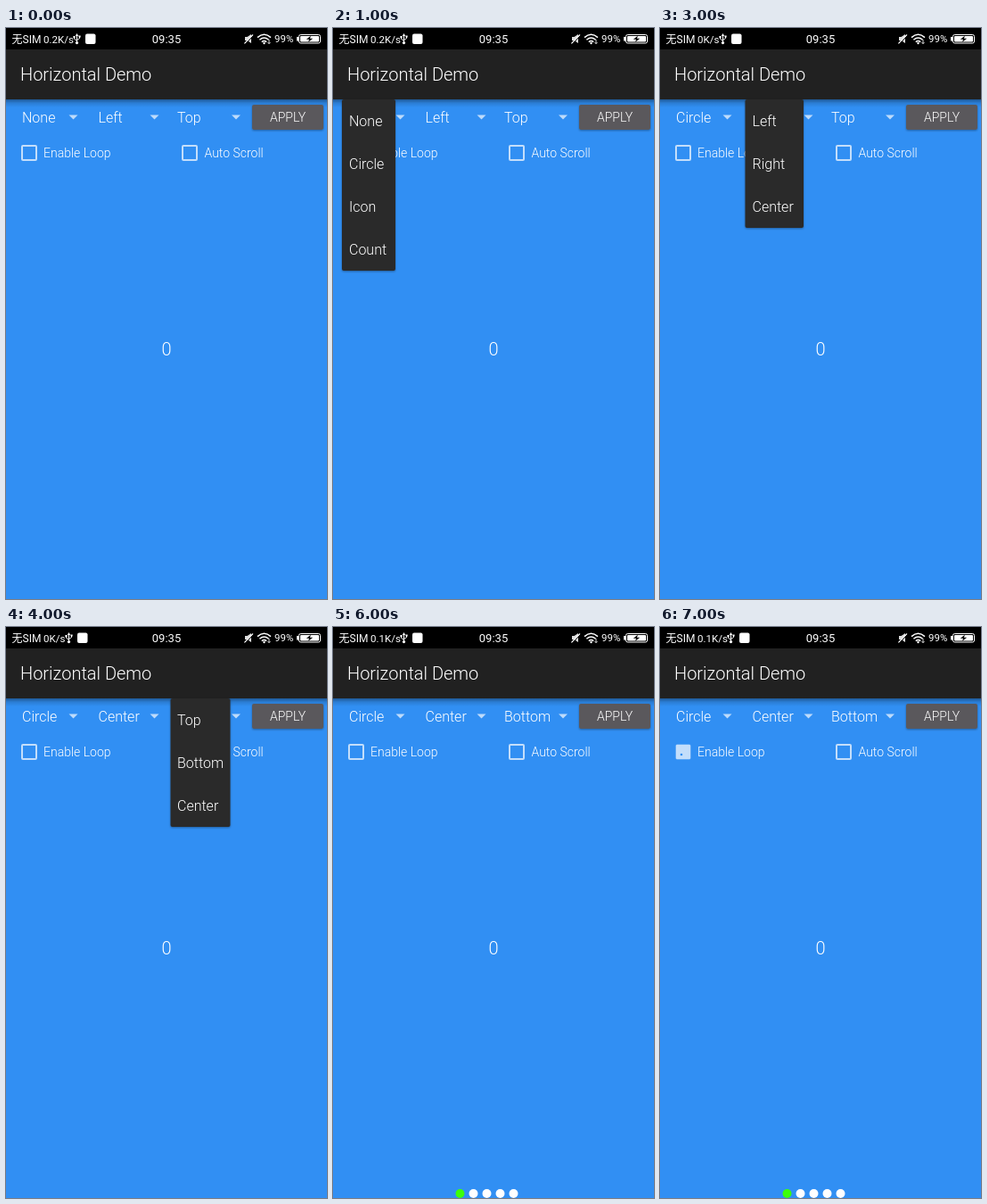
These frames come from a looping animation (360 by 640 pixels, 8 s). An HTML page:

```html
<!DOCTYPE html>
<html lang="en">
<head>
<meta charset="utf-8">
<title>Horizontal Demo</title>
<style>
  html, body { margin: 0; width: 100%; height: 100%; overflow: hidden; background: #318ff3; }
  svg { display: block; width: 360px; height: 640px; }
  text { font-family: Roboto, "Noto Sans CJK SC", "Noto Sans CJK", sans-serif; font-weight: 300; fill: #fff; }
  .status text { font-size: 12px; font-weight: 400; }
  .title, .page { font-size: 20px; }
  .item { font-size: 16px; }
  .small { font-size: 14px; }
  .mid { text-anchor: middle; }
  .line { fill: none; stroke: #fff; }
  .box { fill: none; stroke: #c3defb; stroke-width: 2; }
  .arrow { fill: #bddbfb; }
</style>
</head>
<body>
<svg viewBox="0 0 360 640">
  <defs>
    <linearGradient id="shade" x2="0" y2="1">
      <stop offset="0" stop-opacity=".38"/>
      <stop offset=".45" stop-opacity=".13"/>
      <stop offset="1" stop-opacity="0"/>
    </linearGradient>
    <filter id="lift" x="-15%" y="-15%" width="130%" height="140%">
      <feDropShadow dx="0" dy="1" stdDeviation="1" flood-opacity=".35"/>
    </filter>
  </defs>

  <rect width="360" height="640" fill="#318ff3"/>
  <text class="page mid" x="180" y="367">0</text>
  <g id="dots"></g>

  <rect y="80" width="360" height="9" fill="url(#shade)"/>
  <rect y="24" width="360" height="56" fill="#212121"/>
  <text class="title" x="16" y="59">Horizontal Demo</text>

  <g class="status">
    <rect width="360" height="24"/>
    <text x="6.5" y="16.5">无SIM</text>
    <text id="speed" x="42" y="16.5" style="font-size:11.5px"></text>
    <g id="icons">
      <path class="line" d="M79.5 8V17M76.5 10V12.2L79.5 14.2M82.5 9.5V11.6L79.5 13.6"/>
      <path d="M77.8 9L79.5 6L81.2 9ZM75.4 9h2.2v2h-2.2ZM81.4 8.6h2.2v2h-2.2Z" fill="#fff"/>
      <circle cx="79.5" cy="16.6" r="1.6" fill="#fff"/>
      <rect x="89" y="6.5" width="11.5" height="11.5" rx="2" fill="#fff"/>
    </g>
    <text class="mid" x="180" y="16.8" style="font-size:13px">09:35</text>
    <path d="M268 10h2.5L275 7V17L270.5 14H268Z" fill="#ddd"/>
    <path class="line" d="M267.5 17.5L277 7.5" stroke-width="1.2"/>
    <path d="M268.3 18.2L277.6 8.4" stroke="#000"/>
    <path class="line" stroke-width="1.5" d="M282 10.6Q289.5 3.8 297 10.6M284.4 13.2Q289.5 8.8 294.6 13.2M286.8 15.6Q289.5 13.4 292.2 15.6"/>
    <circle cx="289.5" cy="17" r="1.2" fill="#fff"/>
    <path d="M295 13v4.5M293.5 16l1.5 1.7 1.5-1.7" class="line" stroke-width=".8"/>
    <text x="301" y="16.3" style="font-size:11.5px">99%</text>
    <rect x="328.5" y="7.5" width="24" height="9.5" rx="2" class="line"/>
    <rect x="330" y="9" width="21" height="6.5" rx="1" fill="#fff"/>
    <rect x="326" y="10" width="2" height="4.5" fill="#fff"/>
    <path d="M341.8 8.8L336.8 12.8H340L339 15.8L344.2 11.7H341Z"/>
  </g>

  <g id="spinners"></g>
  <rect x="276" y="86" width="80" height="28" rx="2" fill="#5a595b" filter="url(#lift)"/>
  <text class="small mid" x="316" y="105">APPLY</text>

  <rect id="loop" class="box" x="18" y="132" width="16" height="16" rx="1"/>
  <circle id="tick" cx="24" cy="143" r="1.3" fill="#318ff3"/>
  <text class="small" x="42" y="145">Enable Loop</text>
  <rect class="box" x="198" y="132" width="16" height="16" rx="1"/>
  <text class="small" x="222.5" y="145">Auto Scroll</text>

  <g id="menus"></g>
</svg>
<script>
const STEP = 1000;
const $ = id => document.getElementById(id);

function add(parent, tag, attrs, label) {
  const el = document.createElementNS('http://www.w3.org/2000/svg', tag);
  for (const key in attrs) el.setAttribute(key, attrs[key]);
  if (label) el.textContent = label;
  return parent.appendChild(el);
}

const lists = [
  { x: 18, arrow: 75.5, left: 10, width: 60, items: ['None', 'Circle', 'Icon', 'Count'] },
  { x: 103.5, arrow: 166.5, left: 95.5, width: 65.5, items: ['Left', 'Right', 'Center'] },
  { x: 192, arrow: 258, left: 184.5, width: 67, items: ['Top', 'Bottom', 'Center'] }
];

for (const list of lists) {
  list.label = add($('spinners'), 'text', { class: 'item', x: list.x, y: 106 });
  add($('spinners'), 'path', { class: 'arrow', d: `M${list.arrow - 5} 97.5h10l-5 5Z` });
  list.menu = add($('menus'), 'g', {});
  add(list.menu, 'rect', {
    x: list.left, y: 80, width: list.width, height: list.items.length * 48,
    rx: 2, fill: '#2b2b2b', filter: 'url(#lift)'
  });
  list.items.forEach((item, i) =>
    add(list.menu, 'text', { class: 'item', x: list.x, y: 109.7 + i * 48 }, item));
}

for (let i = 0; i < 5; i++)
  add($('dots'), 'circle', { cx: 142.5 + i * 15, cy: 635, r: 5, fill: i ? '#fff' : '#3cff0a' });

// picks: chosen item per list; open: visible menu; fade: menu closing
const states = [
  { speed: '0.2K/s', picks: [0, 0, 0] },
  { speed: '0.2K/s', picks: [0, 0, 0], open: 0 },
  { speed: '0K/s', picks: [1, 0, 0] },
  { speed: '0K/s', picks: [1, 0, 0], open: 1 },
  { speed: '0K/s', picks: [1, 2, 0], open: 2 },
  { speed: '0.1K/s', picks: [1, 2, 1], open: 2, fade: true },
  { speed: '0.1K/s', picks: [1, 2, 1], dots: true },
  { speed: '0.1K/s', picks: [1, 2, 1], dots: true, loop: true }
];

const show = (el, on) => el.setAttribute('visibility', on ? 'visible' : 'hidden');

function render(state) {
  $('speed').textContent = state.speed;
  $('icons').setAttribute('transform', `translate(${state.speed.length > 4 ? 0 : -9} 0)`);
  lists.forEach((list, i) => {
    const { label, menu, items, left, width } = list;
    label.textContent = items[state.picks[i]];
    show(menu, state.open === i);
    const cx = left + width / 2;
    menu.setAttribute('opacity', state.fade ? 0.32 : 1);
    menu.setAttribute('transform', state.fade
      ? `translate(${cx} 80) scale(.93) translate(${-cx} -80)` : '');
  });
  show($('dots'), state.dots);
  show($('tick'), state.loop);
  $('loop').style.fill = state.loop ? '#c3defb' : 'none';
  $('loop').style.strokeWidth = state.loop ? 0.6 : 2;
}

const start = performance.now();
let current = -1;

function tick() {
  const next = Math.floor((performance.now() - start) / STEP) % states.length;
  if (next !== current) render(states[current = next]);
  requestAnimationFrame(tick);
}
tick();
</script>
</body>
</html>
```
